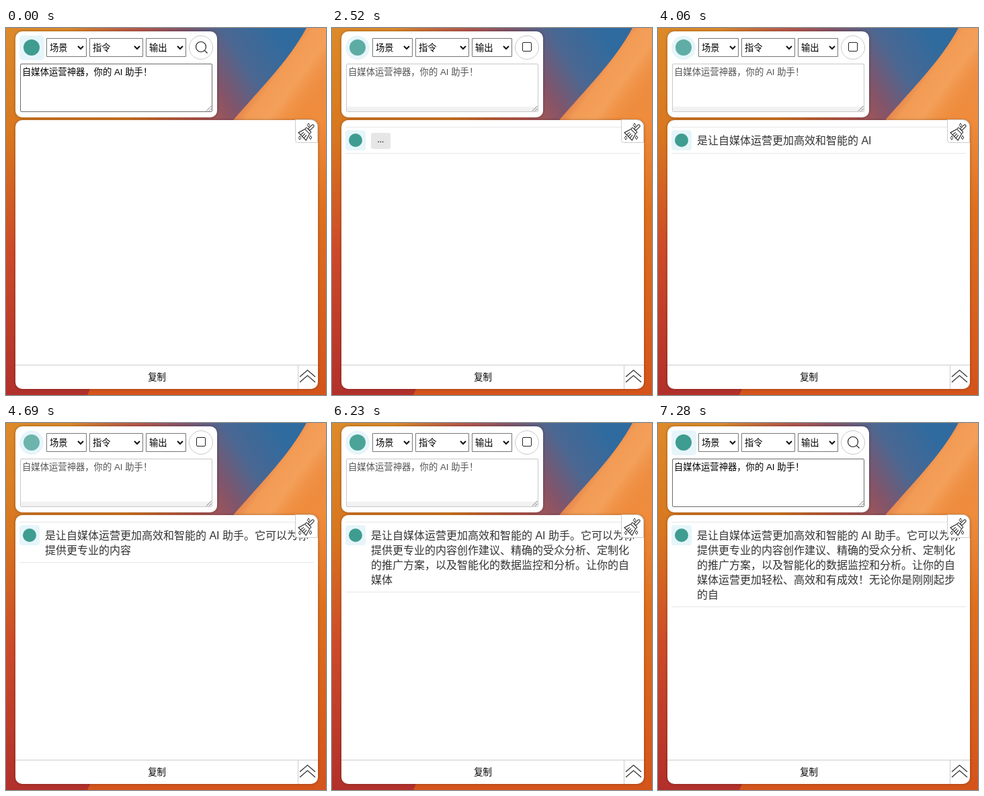
Recreate the animation shown at these times as an HTML page with a canvas. Size 476 by 546 pixels, loop 8000 ms.

```html
<!DOCTYPE html>
<html lang="zh">
<head>
<meta charset="utf-8">
<style>
html, body { margin: 0; width: 476px; height: 546px; overflow: hidden; }
canvas { display: block; }
</style>
</head>
<body>
<canvas id="stage" width="476" height="546"></canvas>
<script>
const ctx = document.getElementById('stage').getContext('2d');
const W = 476, H = 546, LOOP = 8000;
const FONT = '"Liberation Sans", "Noto Sans CJK SC", "Noto Sans CJK", sans-serif';
const TEAL = '#3f9c90', TILE = '#e6f5fa';

const BUSY_FROM = 70, BUSY_TO = 7280, PULSE_FROM = 1960, REPLY_FROM = 2100;
const LINES = [
  '是让自媒体运营更加高效和智能的 AI 助手。它可以为你',
  '提供更专业的内容创作建议、精确的受众分析、定制化',
  '的推广方案，以及智能化的数据监控和分析。让你的自',
  '媒体运营更加轻松、高效和有成效！无论你是刚刚起步',
  '的自'
];
// [time, value...] keys, interpolated linearly
const TYPING = [[3430, 1], [4060, 18], [5320, 53], [6230, 77], [7280, 101]];
const POINTER = [[5040, 14, 246], [5180, 44, 186], [5320, 88, 115], [5530, 5, -20]];

function track(keys, t) {
  if (t <= keys[0][0]) return keys[0].slice(1);
  for (let i = 1; i < keys.length; i++) {
    const a = keys[i - 1], b = keys[i];
    if (t <= b[0]) {
      const k = (t - a[0]) / (b[0] - a[0]);
      return a.slice(1).map((v, j) => v + (b[j + 1] - v) * k);
    }
  }
  return keys[keys.length - 1].slice(1);
}

function gradient(x0, y0, x1, y1, ...stops) {
  const g = ctx.createLinearGradient(x0, y0, x1, y1);
  stops.forEach(([at, color]) => g.addColorStop(at, color));
  return g;
}

function box(x, y, w, h, r, fill, stroke) {
  ctx.beginPath();
  ctx.roundRect(x, y, w, h, r);
  if (fill) { ctx.fillStyle = fill; ctx.fill(); }
  if (stroke) { ctx.strokeStyle = stroke; ctx.lineWidth = 1; ctx.stroke(); }
}

function disc(x, y, r, fill, stroke, width = 1) {
  ctx.beginPath();
  ctx.arc(x, y, r, 0, Math.PI * 2);
  if (fill) { ctx.fillStyle = fill; ctx.fill(); }
  if (stroke) { ctx.strokeStyle = stroke; ctx.lineWidth = width; ctx.stroke(); }
}

function line(color, width, ...p) {
  ctx.beginPath();
  for (let i = 0; i < p.length; i += 2) ctx.lineTo(p[i], p[i + 1]);
  ctx.strokeStyle = color;
  ctx.lineWidth = width;
  ctx.stroke();
}

function text(str, x, y, size, color, align = 'left') {
  ctx.font = `${size}px ${FONT}`;
  ctx.textAlign = align;
  ctx.fillStyle = color;
  ctx.fillText(str, x, y);
}

function wallpaper() {
  ctx.fillStyle = gradient(0, 0, 0, H, [0, '#dd8a2a'], [0.3, '#d8761f'], [0.6, '#cd4b28'], [1, '#b2302b']);
  ctx.fillRect(0, 0, W, H);
  ctx.fillStyle = gradient(180, 140, 400, 0, [0, 'rgba(176,72,70,0)'], [0.35, '#b5564c'],
    [0.55, '#845469'], [0.75, '#4a6792'], [1, '#2f6b9f']);
  ctx.fillRect(0, 0, W, 140);

  ctx.beginPath();
  ctx.moveTo(447, 0);
  ctx.bezierCurveTo(420, 50, 380, 88, 334, 142);
  ctx.bezierCurveTo(250, 270, 180, 420, 121, H);
  ctx.lineTo(W, H);
  ctx.lineTo(W, 0);
  ctx.fillStyle = gradient(0, 0, 0, H, [0, '#ec8e48'], [0.25, '#ef8c3c'], [0.5, '#dd701f'], [1, '#d4541b']);
  ctx.fill();

  ctx.beginPath();
  ctx.moveTo(447, 0);
  ctx.bezierCurveTo(420, 50, 380, 88, 334, 142);
  ctx.lineTo(W, 142);
  ctx.lineTo(W, 0);
  ctx.fillStyle = gradient(385, 65, 460, 120, [0, 'rgba(222,126,78,.85)'], [0.2, '#f29b55'],
    [0.5, '#f4a05a'], [1, 'rgba(236,136,54,0)']);
  ctx.fill();
}

function panel(x, y, w, h) {
  ctx.save();
  ctx.shadowColor = 'rgba(0,0,0,.3)';
  ctx.shadowBlur = 4;
  box(x, y, w, h, 10, '#fff');
  ctx.restore();
}

function select(label, x, w) {
  box(x + 0.5, 15.5, w - 1, 27, 0, '#fff', '#767676');
  text(label, x + 5, 34, 13.33, '#000');
  const c = x + w - 9;
  line('#111', 2, c - 4, 27, c, 31, c + 4, 27);
}

function broom() {
  const ink = '#222';
  ctx.save();
  ctx.translate(447, 155);
  ctx.rotate(Math.PI / 4);
  box(-1.8, -15, 3.6, 10, 1.8, '#fff', ink);
  box(-5, -5, 10, 3.5, 1, '#fff', ink);
  line(ink, 1.1, -5, -1.5, -8, 9, 8, 9, 5, -1.5);
  for (const x of [-3.5, 0, 3.5]) line(ink, 1, x, 9, x * 0.8, 3);
  ctx.restore();
  for (const [x, y] of [[450, 144.5], [437, 163.5], [453, 163]]) {
    line(ink, 0.9, x, y - 2.8, x + 1.8, y, x, y + 2.8, x - 1.8, y, x, y - 2.8);
  }
}

function toolbar(busy, t) {
  panel(14, 5, 300, 128);
  if (busy) disc(38, 29.3, 18, TILE);
  else box(20, 11, 37, 37, 5, TILE);
  const phase = Math.max(0, t - PULSE_FROM) / 2600;
  ctx.globalAlpha = busy ? 0.85 - 0.13 * Math.cos(phase * Math.PI * 2) : 1;
  disc(38, 29, 12, TEAL);
  ctx.globalAlpha = 1;

  select('场景', 60, 60);
  select('指令', 124, 80);
  select('输出', 208, 60);

  disc(290, 29, 17.5, '#fff', '#c9c9c9');
  if (busy) {
    box(283.5, 21.5, 13, 13, 1.5, null, '#222');
  } else {
    disc(290, 28, 7.5, null, '#222', 1.2);
    line('#222', 1.2, 295.3, 33.3, 299.5, 37.5);
  }

  box(21.5, 53.5, 285, 71, 1.5, '#fff', busy ? '#c8c8c8' : '#6c6c6c');
  if (busy) {
    ctx.fillStyle = '#f2f2f2';
    ctx.fillRect(22, 117, 284, 7);
  }
  line('#666', 0.9, 298, 123.5, 305.5, 116);
  line('#666', 0.9, 302, 123.5, 305.5, 120);
  text('自媒体运营神器，你的 AI 助手！', 24, 70, 13.33, busy ? '#545454' : '#000');
}

function reply(t) {
  let left = t < TYPING[0][0] ? 0 : Math.floor(track(TYPING, t)[0] + 1e-6);
  let rows = 0;
  if (left === 0) {
    box(58, 156, 29, 24, 3, '#e6e6e6');
    for (const x of [69, 72.3, 75.6]) disc(x, 169.3, 0.9, '#333');
  }
  for (const row of LINES) {
    if (left <= 0) break;
    text(row.slice(0, left), 58, 173 + rows * 22, 16, '#333');
    left -= row.length;
    rows++;
  }
  box(20, 152, 30, 30, 4, TILE);
  disc(35, 167, 10, TEAL);
  ctx.fillStyle = '#e6e6e6';
  ctx.fillRect(20, 147, 438, 1);
  ctx.fillRect(20, Math.max(186, 163 + rows * 22), 438, 1);
}

function results(t) {
  panel(14, 137, 450, 400);
  if (t >= REPLY_FROM) reply(t);

  box(430.5, 136.5, 33, 34, [0, 10, 0, 3], '#fff', '#ccc');
  broom();

  line('#ccc', 1, 14, 501.5, 464, 501.5);
  line('#ccc', 1, 434.5, 502, 434.5, 537);
  text('复制', 224.5, 524, 13.33, '#000', 'center');
  for (const y of [509, 517]) line('#333', 1.3, 437, y + 10, 448.5, y, 460, y + 10);
}

function pointer(t) {
  if (t < POINTER[0][0] || t > POINTER[POINTER.length - 1][0]) return;
  const [x, y] = track(POINTER, t);
  ctx.save();
  ctx.translate(x, y);
  ctx.beginPath();
  for (const [px, py] of [[0, 0], [0, 14], [3.2, 11], [5.6, 16.5], [8, 15.5], [5.7, 10.2], [10, 10]]) ctx.lineTo(px, py);
  ctx.closePath();
  ctx.lineWidth = 1.6;
  ctx.strokeStyle = '#fff';
  ctx.stroke();
  ctx.fillStyle = '#000';
  ctx.fill();
  ctx.restore();
}

function draw(t) {
  const busy = t >= BUSY_FROM && t < BUSY_TO;
  wallpaper();
  toolbar(busy, t);
  results(t);
  pointer(t);
}

const start = performance.now();
function tick() {
  draw((performance.now() - start) % LOOP);
  requestAnimationFrame(tick);
}
tick();
</script>
</body>
</html>
```
